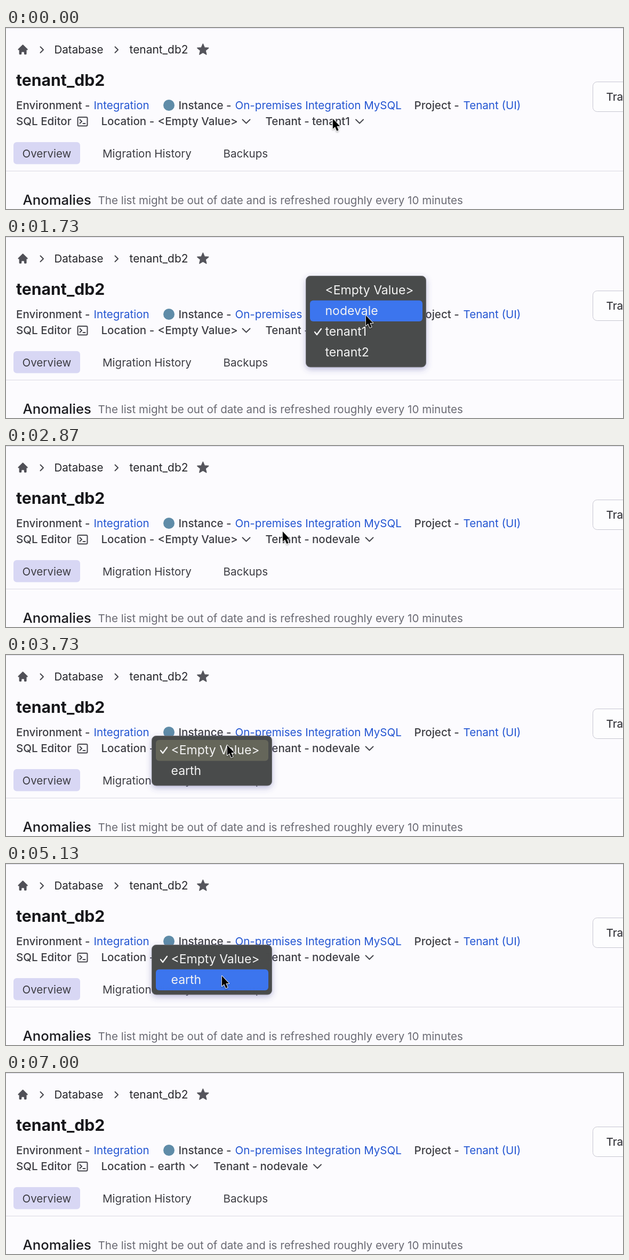
An HTML page for the animation above (7070 ms loop, 1157 by 341 pixels).

```html
<!DOCTYPE html>
<html lang="en">
<head>
<meta charset="utf-8">
<title>Database overview</title>
<style>
  html, body { margin: 0; width: 100%; height: 100%; overflow: hidden; background: #fcfbfe; }
  svg { display: block; width: 100%; height: 100%; font-family: Inter, "Open Sans", sans-serif; }
  text { white-space: pre; }
  .line { fill: none; stroke: #46464d; stroke-width: 2; stroke-linecap: round; stroke-linejoin: round; }
</style>
</head>
<body>
<svg id="stage" viewBox="0 0 1157 341">
  <defs>
    <filter id="soft" x="-20%" y="-20%" width="140%" height="150%">
      <feDropShadow dx="0" dy="4" stdDeviation="6" flood-color="#4a4a9c" flood-opacity=".36"/>
    </filter>
    <filter id="faint" x="-50%" y="-50%" width="200%" height="200%">
      <feDropShadow dx="0" dy="2" stdDeviation="1.5" flood-opacity=".3"/>
    </filter>
  </defs>
</svg>
<script>
const LOOP = 7070;
const SIZE = 20.55;
const INK = '#3d3d43', LINK = '#2456d2';
const stage = document.getElementById('stage');

function add(parent, tag, attrs, content) {
  const el = document.createElementNS('http://www.w3.org/2000/svg', tag);
  for (const key in attrs) el.setAttribute(key, attrs[key]);
  if (content) el.textContent = content;
  parent.appendChild(el);
  return el;
}

function label(x, y, content, fill = INK, weight = 500, size = SIZE, parent = stage) {
  return add(parent, 'text', { x, y, fill, 'font-weight': weight, 'font-size': size }, content);
}

const line = (d, parent = stage) => add(parent, 'path', { d, class: 'line' });
const move = (el, x, y) => el.setAttribute('transform', `translate(${x} ${y})`);

function starPath(cx, cy, outer, inner) {
  const points = Array.from({ length: 10 }, (_, i) => {
    const r = i % 2 ? inner : outer, a = i * Math.PI / 5;
    return [cx + r * Math.sin(a), cy - r * Math.cos(a)].map(v => v.toFixed(2)).join(' ');
  });
  return `M${points.join('L')}Z`;
}

// Page
add(stage, 'rect', { width: 1157, height: 341, fill: '#fcfbfe' });
add(stage, 'rect', { width: 1157, height: 1, fill: '#d9d7e5' });
add(stage, 'rect', { y: 269, width: 1157, height: 1, fill: '#d9d9e3' });

// Breadcrumb
add(stage, 'path', {
  transform: 'translate(20 29) scale(1.16)', fill: '#505057',
  d: 'M10.7 2.3a1 1 0 00-1.4 0l-7 7a1 1 0 001.4 1.4L4 10.4V17a1 1 0 001 1h2a1 1 0 001-1v-2a1 1 0 011-1h2a1 1 0 011 1v2a1 1 0 001 1h2a1 1 0 001-1v-6.6l.3.3a1 1 0 001.4-1.4z'
});
for (const x of [64.5, 204.5]) line(`M${x} 35.5l5.5 5.5l-5.5 5.5`);
label(90.5, 48, 'Database', '#26262b', 400);
label(231.5, 48, 'tenant_db2', '#26262b', 400, 20.9);
add(stage, 'path', {
  d: starPath(369.3, 41, 11, 5), fill: '#55555c', stroke: '#55555c',
  'stroke-width': 1.5, 'stroke-linejoin': 'round'
});

// Header
label(19, 108.5, 'tenant_db2', '#17171b', 700, 30.2);
label(19, 153, 'Environment -');
label(164.5, 153, 'Integration', LINK, 400);
add(stage, 'circle', { cx: 305.5, cy: 145.5, r: 10.5, fill: '#5f8ca8' });
label(323.5, 153, 'Instance -');
label(429.5, 153, 'On-premises Integration MySQL', LINK, 400);
label(765.5, 153, 'Project -');
label(857.5, 153, 'Tenant (UI)', LINK, 400);
add(stage, 'rect', {
  x: 1100.5, y: 101.5, width: 90, height: 56, rx: 8, fill: '#fff', 'fill-opacity': .5, stroke: '#c6c6d1'
});
label(1125.5, 137, 'Tra');

label(19, 183, 'SQL Editor');
add(stage, 'rect', { x: 134.5, y: 168, width: 18, height: 16.5, rx: 2, class: 'line' });
line('M138.5 172.5l3.7 3.5l-3.7 3.5M144.5 180h4');

// Editable labels
const chevron = () => line('M-7 -3.5L0 3.5L7 -3.5');
label(178.5, 183, 'Location -');
const place = label(284.5, 183, '');
const placeArrow = chevron();
const tenantName = label(0, 183, 'Tenant -');
const tenant = label(0, 183, '');
const tenantArrow = chevron();

// Tabs and list
add(stage, 'rect', { x: 14, y: 215, width: 125, height: 41.5, rx: 6, fill: '#d8d7f4' });
label(30.5, 243.5, 'Overview', INK, 400);
label(181, 243.5, 'Migration History', INK, 400);
label(407.5, 243.5, 'Backups', INK, 400);
label(31.5, 333, 'Anomalies', '#1b1b20', 500, 25.7);
label(172.5, 332, 'The list might be out of date and is refreshed roughly every 10 minutes', '#6a6a73', 400);

// Popup menus
const ROW = 39;

function makeMenu(x, y, items, checked) {
  const g = add(stage, 'g', { transform: `translate(${x} ${y})` });
  add(g, 'rect', {
    x: .5, y: .5, width: 225, height: items.length * ROW + 15.5, rx: 8,
    fill: '#4a4c4b', stroke: '#6c6d70', filter: 'url(#soft)'
  });
  const bar = add(g, 'rect', { x: 8, width: 211, height: ROW + .5, rx: 6 });
  items.forEach((item, i) => label(36.5, 35 + i * ROW, item, '#f3f3f3', 400, 23, g));
  const mark = line(`M17 ${28 + checked * ROW}l4 5l8 -11`, g);
  mark.style.cssText = 'stroke:#f3f3f3;stroke-width:2.4';
  return { g, bar };
}

const EMPTY = '<Empty Value>', NEW_TENANT = 'nodevale', NEW_PLACE = 'earth';
const tenantMenu = makeMenu(562, 73, [EMPTY, NEW_TENANT, 'tenant1', 'tenant2'], 2);
const placeMenu = makeMenu(273, 152, [EMPTY, NEW_PLACE], 0);

// Pointer
const pointer = add(stage, 'g', { filter: 'url(#faint)' });
add(pointer, 'path', {
  d: 'M.8 .8V20L5 16.2L8.4 24L11.6 22.5L8.4 15H14.2Z',
  fill: '#050505', stroke: '#fff', 'stroke-width': 1.8, 'stroke-linejoin': 'round', 'paint-order': 'stroke'
});

// time, x, y
const route = [
  [0, 612, 170], [870, 612, 170], [1070, 667, 147], [1270, 674, 147], [2270, 674, 147],
  [3330, 414, 169], [4130, 414, 169], [4530, 404, 210], [5270, 404, 210], [5670, 548, 195],
  [5930, 552, 198], [6530, 690, 350]
];

function along(t) {
  const i = route.findIndex(stop => stop[0] > t);
  if (i < 0) return route[route.length - 1].slice(1);
  const [t0, x0, y0] = route[i - 1], [t1, x1, y1] = route[i];
  const p = (t - t0) / (t1 - t0), e = p * p * (3 - 2 * p);
  return [x0 + (x1 - x0) * e, y0 + (y1 - y0) * e];
}

function showMenu({ g, bar }, t, open, close, row) {
  const fade = Math.min(1, Math.max(0, (close + 200 - t) / 200));
  g.style.display = t >= open && fade > 0 ? '' : 'none';
  g.style.opacity = fade;
  bar.setAttribute('y', 8 + row * ROW - (row ? .5 : 0));
  bar.setAttribute('fill', t < open + 100 ? '#65665a' : '#3c75ee');
  // The chosen row blinks once before the menu closes.
  bar.style.opacity = t > close - 140 && t < close - 70 ? 0 : 1;
}

function setText(el, content) {
  if (el.textContent !== content) el.textContent = content;
}

function draw(t) {
  const placed = t >= 5400, renamed = t >= 2130;
  const left = placed ? 389 : 486.5;

  setText(place, placed ? NEW_PLACE : EMPTY);
  move(placeArrow, placed ? 352.5 : 450.5, 176);
  tenantName.setAttribute('x', left);
  tenant.setAttribute('x', left + 87.5);
  setText(tenant, renamed ? NEW_TENANT : 'tenant1');
  move(tenantArrow, left + (renamed ? 195 : 176.5), 176);

  showMenu(tenantMenu, t, 870, 1740, t < 980 ? 2 : 1);
  showMenu(placeMenu, t, 3660, 5130, t < 4330 ? 0 : 1);
  move(pointer, ...along(t));
}

function tick(now) {
  draw(now % LOOP);
  requestAnimationFrame(tick);
}

draw(0);
requestAnimationFrame(tick);
</script>
</body>
</html>
```
